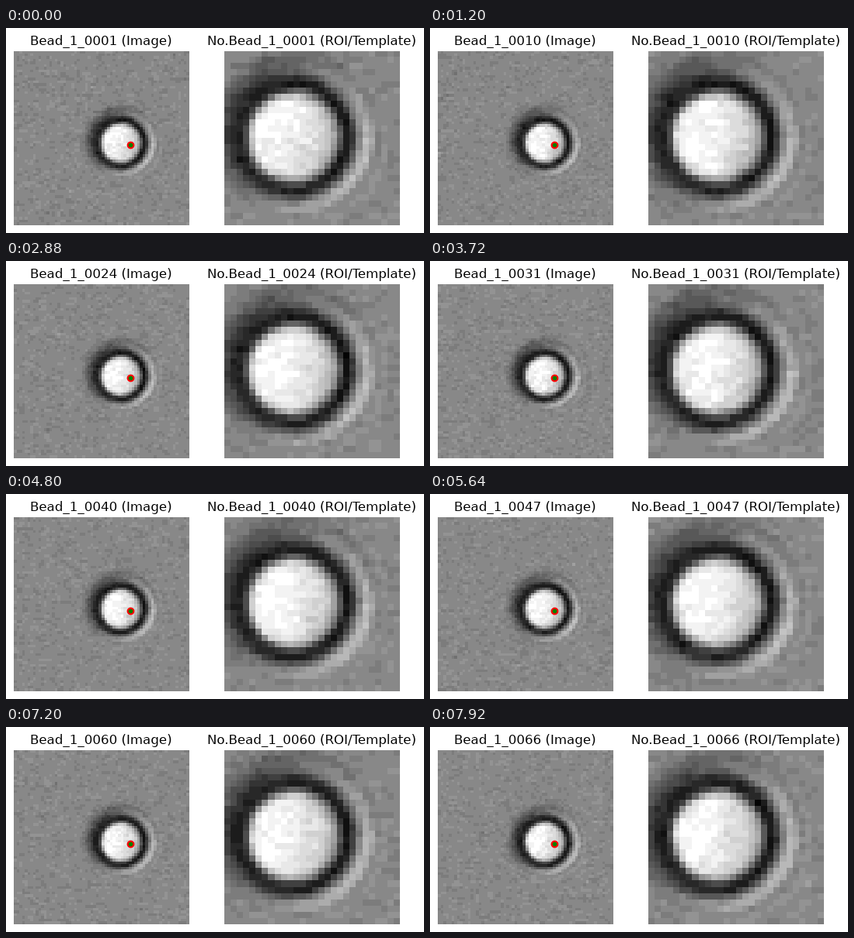
Write a matplotlib script that moves like this. It is 538 by 265 pixels and loops after 8 s.

```python
import numpy as np
import matplotlib.pyplot as plt
from matplotlib.animation import FuncAnimation

plt.rcParams["text.hinting"] = "default"

W, H, DPI = 538, 265, 100
SIDE = 225.45            # panel side in pixels
GRID, CROP = 64, 28      # image and region sizes in cells
MARK = (42, 34)          # tracked point, centre of the region
BEAD = (39.0, 33.3)
GREY, STEP = 136, 12     # background level and grey-level spacing


def bump(r, centre, width):
    return np.exp(-0.5 * ((r - centre) / width) ** 2)


def facing(angle, degrees):
    """1 towards the given direction, 0 on the opposite side."""
    return (1 + np.cos(angle - np.radians(degrees))) / 2


def bead_image():
    y, x = np.mgrid[:GRID, :GRID]
    dx, dy = x - BEAD[0], y - BEAD[1]
    r, angle = np.hypot(dx, dy), np.arctan2(dy, dx)
    left = facing(angle, 180)

    # Bright core, lit from the upper left, softer on its right edge
    core = np.minimum(236 - 6 * dx - 2 * dy, 250)
    edge = 6.3 + 1.2 * left + 0.15 * np.sin(angle)
    inside = 1 / (1 + np.exp((r - edge) / (0.75 - 0.4 * left)))

    # Dark ring, wider on the left, with fainter fringes around it
    ring = (134 - 34 * left) * bump(r, 8 + 0.9 * left**2, 1.1 + 0.8 * left**2)
    shade = 40 * bump(r, 12, 1.6) * facing(angle, -125) ** 1.5
    glow = 48 * bump(r, 11.2, 0.9) * facing(angle, 20) ** 1.5
    ripple = 9 * np.cos(2 * np.pi * (r - 11.2) / 3) * bump(r, 13, 1.8)
    outside = GREY - ring - shade + glow + ripple * facing(angle, 20)
    return inside * core + (1 - inside) * outside


def noise(seed):
    n = np.random.default_rng(seed).normal(0, 1, (GRID, GRID))
    return 0.93 * n + 0.37 * np.roll(n, 1, axis=1)


BASE = bead_image() + 2.5 * noise(1000)
SIGMA = 5 + 3 * np.clip((BASE - 180) / 60, 0, 1)


def shot(number):
    img = BASE + SIGMA * noise(number)
    img = GREY + STEP * np.round((img - GREY) / STEP)
    return np.clip(img, 0, 255)


def region(img):
    x, y = MARK[0] - CROP // 2, MARK[1] - CROP // 2
    return img[y:y + CROP, x:x + CROP]


fig = plt.figure(figsize=(W / DPI, H / DPI), dpi=DPI, facecolor="white")


def panel(left, img):
    ax = fig.add_axes([left / W, 10 / H, SIDE / W, SIDE / H])
    ax.axis("off")
    pic = ax.imshow(img, cmap="gray", vmin=0, vmax=255, interpolation="nearest")
    title = ax.set_title("", fontsize=12, family="DejaVu Sans", pad=5.4)
    return ax, pic, title


first = shot(1)
ax, full, full_title = panel(10, first)
_, crop, crop_title = panel(280.55, region(first))
ax.plot(*MARK, "o", color="red", markersize=6)
ax.plot(*MARK, ".", color="green", markersize=6)


def update(k):
    number = max(1, k // 3)   # the first shot is held twice as long
    img = shot(number)
    full.set_data(img)
    crop.set_data(region(img))
    name = f"Bead_1_{number:04d}"
    full_title.set_text(f"{name} (Image)")
    crop_title.set_text(f"No.{name} (ROI/Template)")
    return full, crop, full_title, crop_title


anim = FuncAnimation(fig, update, frames=200, interval=40, repeat=True, repeat_delay=0)
plt.show()
```
